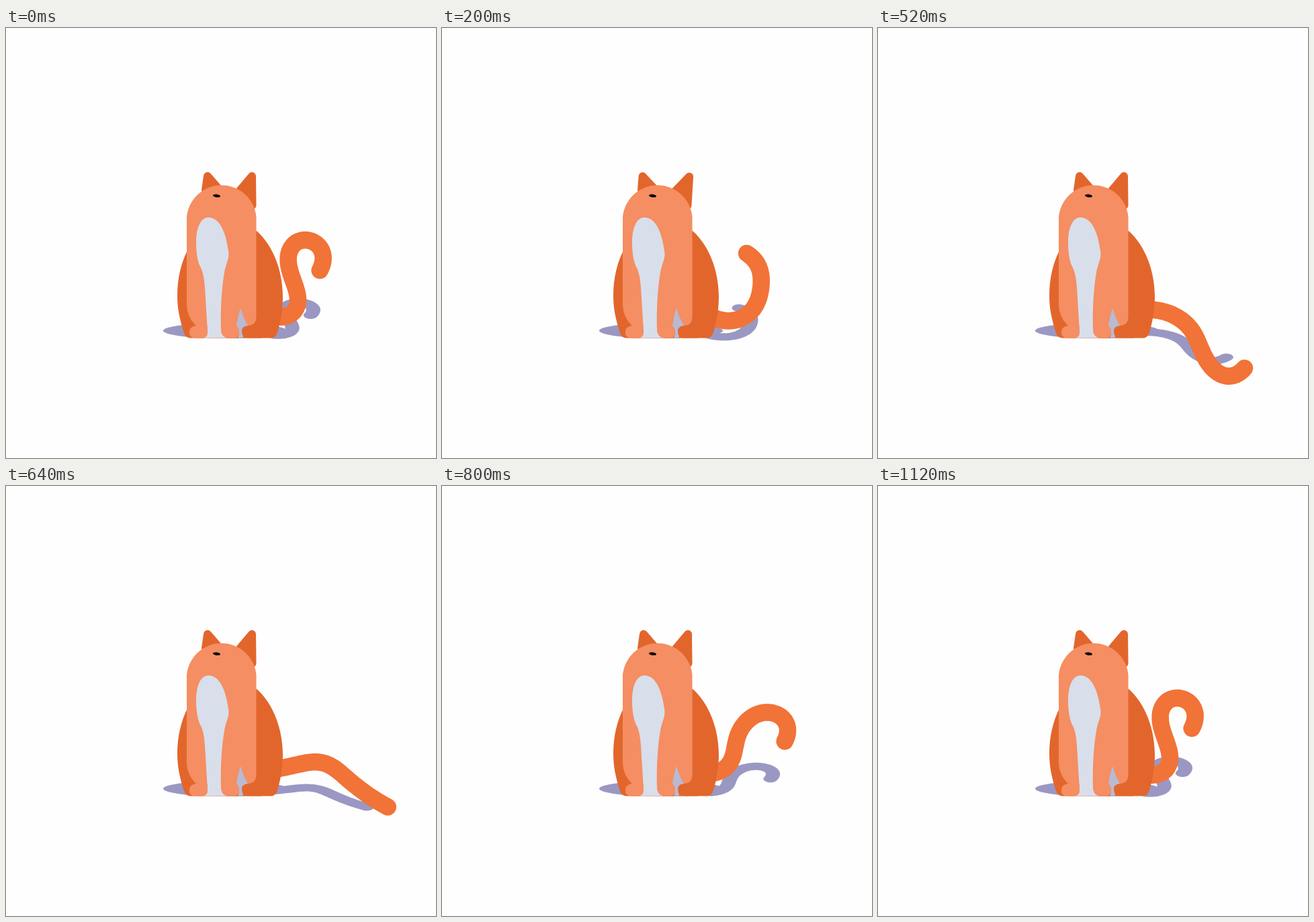
These frames come from a looping animation (640x640 px, 1.32 s). An HTML page:

```html
<!DOCTYPE html>
<html lang="en">
<head>
<meta charset="utf-8">
<title>Cat swishing its tail</title>
<style>
  html, body { margin: 0; height: 100%; overflow: hidden; background: #fefefe; }
  svg { display: block; width: 100%; height: 100%; }
  .dark { fill: #e2662c; }
  .light { fill: #f58e62; }
  .ear { stroke: #e2662c; stroke-width: 12; stroke-linejoin: round; }
  #tail { fill: none; stroke-width: 25.5; stroke-linecap: round; stroke-linejoin: round; }
</style>
</head>
<body>
<svg viewBox="0 0 640 640">
  <defs><path id="tail"/></defs>

  <!-- ground shadow: the tail flattened onto the floor -->
  <g fill="#9a98c2" stroke="#9a98c2">
    <ellipse cx="326" cy="450.5" rx="92" ry="11.5" stroke="none"/>
    <use href="#tail" transform="matrix(.83 0 0 .43 65.5 272.4)"/>
  </g>
  <use href="#tail" stroke="#f17337"/>

  <path class="dark" d="M274 461.500Q267 461 265 454C258 432 255 417 255 398C255 372 261 349 270 331L373 302C398 324 412 362 412 400C412 420 408 440 404 453Q401 461.500 395 461.500Z"/>
  <path id="earL" class="dark ear"/>
  <path id="earR" class="dark ear"/>

  <!-- head, chest and front legs -->
  <path class="light" d="M269 281A52 52 0 0 1 372.500 281V431Q372 442 361 443L343 444Q347 447 347 453Q347 461 340 461.500H282Q273 461 273 453Q273 445 283 443Q269 430 269 410Z"/>
  <path fill="#b9bad2" d="M349 417Q353 431 360 443L352 461.500H345Q347 458 347 453Q347 447 343 444Q345 428 349 417Z"/>
  <path class="dark" d="M362 443Q351 443 351 451Q351 461.500 360 461.500H380V443Z"/>
  <path fill="#d9deeb" d="M301 282C289 282 283 299 283 319C283 338 286 350 290 357C294 366 295 374 296 386L300 452Q299 461 293 461.500H330Q321 460 320 450C319 420 321 386 325 364C327 351 332 345 331.500 335C328 308 320 282 301 282Z"/>
  <path class="light" d="M284 443H299.500L300 453Q300 461 292 461.500H282Q273 461 273 453Q273 444 284 443Z"/>
  <path class="light" d="M320 443H342Q347 446 347 453Q347 461 340 461.500H332Q320 461 320 447Z"/>
  <ellipse cx="313.500" cy="249.800" rx="5.500" ry="2.200" transform="rotate(8 313.500 249.800)"/>
</svg>
<script>
const LOOP = 1320, STEP = 40, SWING = 560, BASE_X = 404, PARTS = 48;

// Key poses. bend: headings in degrees, evenly spaced from base to tip.
const key = (at, length, baseY, ...bend) => ({ at, values: [length, baseY, ...bend] });
const curled = [212, 430, 5, -100, -92, 18, 118];
const keys = [
  key(0, ...curled),
  key(200, 158, 431, 22, -20, -68, -98, -146),
  key(360, 187, 431, 32, 41, 1, -42, -140),
  key(SWING, 192, 418, 0, 32, 72, 45, -40),
  key(834, 184, 425, -20, -55, -8, 27, 100),
  key(2 * SWING, ...curled)
];
const byId = id => document.getElementById(id);

// Cubic from a to b with slopes p and q, u running from 0 to 1.
function hermite(a, b, p, q, u) {
  const v = 1 - u;
  return v * v * (1 + 2 * u) * a + u * u * (3 - 2 * u) * b + u * v * (v * p - u * q);
}

// The tail rests for a moment at the end of each swing.
function slope(i, j) {
  if (keys[i].at % SWING === 0) return 0;
  const a = keys[i - 1], b = keys[i + 1];
  return (b.values[j] - a.values[j]) / (b.at - a.at);
}

function poseAt(time) {
  const i = Math.max(1, keys.findIndex(k => k.at >= time)) - 1;
  const a = keys[i], b = keys[i + 1], d = b.at - a.at;
  return a.values.map((x, j) =>
    hermite(x, b.values[j], d * slope(i, j), d * slope(i + 1, j), (time - a.at) / d));
}

// Smooth heading at s, from 0 at the base to 1 at the tip.
function heading(bend, s) {
  const last = bend.length - 1, i = Math.min(last - 1, Math.floor(s * last));
  const tilt = k => (bend[Math.min(last, k + 1)] - bend[Math.max(0, k - 1)]) / 2;
  return hermite(bend[i], bend[i + 1], tilt(i), tilt(i + 1), s * last - i) * Math.PI / 180;
}

function tailPath([length, y, ...bend]) {
  let x = BASE_X, d = `M${x} ${y}`;
  for (let i = 0; i < PARTS; i++) {
    const h = heading(bend, (i + 0.5) / PARTS);
    x += Math.cos(h) * length / PARTS;
    y += Math.sin(h) * length / PARTS;
    d += `L${x} ${y}`;
  }
  return d;
}

function draw(now) {
  const t = Math.floor(now % LOOP / STEP) * STEP;
  // The way back starts fast and eases out.
  const left = 1 - Math.min(1, Math.max(0, t - SWING) / SWING);
  const phase = Math.min(t, SWING) + SWING * (1 - left * left);
  byId("tail").setAttribute("d", tailPath(poseAt(phase)));

  const twitch = t > 100 && t < 520 ? 1.12 * Math.sin(Math.PI * (t - 100) / 420) ** 2 : 0;
  byId("earL").setAttribute("d", `M297 241L${300 - 2.7 * twitch} ${220.5 + twitch / 2}L319.5 243Z`);
  byId("earR").setAttribute("d", `M347 243L${366 + 4 * twitch} ${220.5 + 1.3 * twitch}L${366.5 - 2 * twitch} 264Z`);
}

const start = performance.now();
function tick() {
  draw(performance.now() - start);
  requestAnimationFrame(tick);
}
tick();
</script>
</body>
</html>
```
